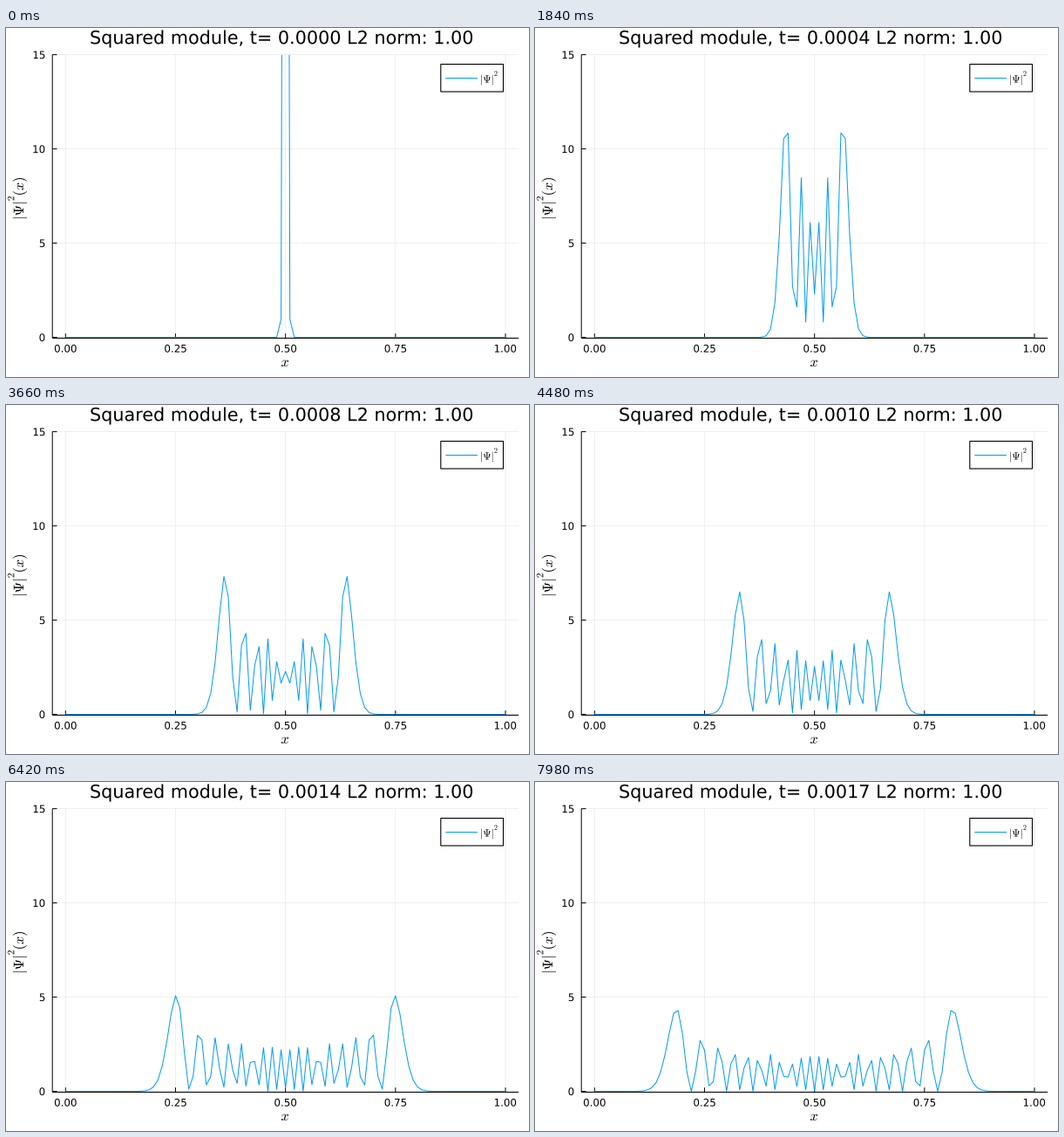
A matplotlib script that plays this animation: 600 by 400 pixels, repeating every 8000 ms.

```python
import numpy as np
import matplotlib.pyplot as plt
from matplotlib.animation import FuncAnimation
from matplotlib.patches import PathPatch, Rectangle
from matplotlib.textpath import TextPath
from matplotlib.transforms import Affine2D

plt.rcParams.update({
    "font.family": "DejaVu Sans",
    "mathtext.fontset": "cm",
    "path.snap": False,
})

W, H, DPI = 600, 400, 100
PT = 72 / DPI                                   # points per pixel
LEFT, RIGHT, TOP, BOTTOM = 53.2, 588.2, 30.6, 355.5
BLUE = "#009afa"
TITLE_SIZE, LABEL_SIZE, TICK_SIZE = 20.75, 16.3, 11.86

N, STEPS = 101, 172
DX, DT = 0.01, 1e-5
HOP = 0.0999                                    # hopping phase per step


def px(x):
    return 68.3 + 504.7 * np.asarray(x)


def py(y):
    return 354.5 - 21.593 * np.asarray(y)


def evolve():
    """Crank-Nicolson for a free particle released from one grid point."""
    ham = HOP * (2 * np.eye(N) - np.eye(N, k=1) - np.eye(N, k=-1))
    half = 0.5j * ham
    step = np.linalg.solve(np.eye(N) + half, np.eye(N) - half)
    psi = np.zeros(N, complex)
    psi[N // 2] = 1 / np.sqrt(DX)
    states = [psi]
    for _ in range(STEPS):
        states.append(step @ states[-1])
    return np.abs(states) ** 2


density = evolve()
grid = np.linspace(0, 1, N)

fig = plt.figure(figsize=(W / DPI, H / DPI), dpi=DPI, facecolor="white")
ax = fig.add_axes([0, 0, 1, 1])
ax.set(xlim=(0, W), ylim=(H, 0))
ax.axis("off")


def line(xs, ys, width=1.0, color="black", **kw):
    return ax.plot(xs, ys, color=color, lw=width * PT,
                   solid_capstyle="butt", **kw)[0]


def outline(x, y, text, size, ha="left", angle=0):
    """Glyph outlines with the baseline starting at pixel (x, y)."""
    path = TextPath((0, 0), text, size=size)
    box = path.get_extents()
    shift = {"left": 0, "center": (box.x0 + box.x1) / 2, "right": box.x1}[ha]
    place = Affine2D().translate(-shift, 0).scale(1, -1)
    return place.rotate_deg(-angle).translate(x, y).transform_path(path)


def label(*args, zorder=4, **kw):
    patch = PathPatch(outline(*args, **kw), fc="black", lw=0, zorder=zorder)
    return ax.add_patch(patch)


def squared_psi(x, y, size, tail="", angle=0):
    """|Psi| with a high, tight exponent and an optional tail."""
    turn = np.radians(angle)

    def put(text, along, up, scale=1):
        label(x + size * (along * np.cos(turn) - up * np.sin(turn)),
              y - size * (along * np.sin(turn) + up * np.cos(turn)),
              text, size * scale, angle=angle, zorder=6)

    put(r"$|\Psi|$", 0, 0)
    put("$2$", 1.334, 0.65, 0.7)
    if tail:
        put(tail, 1.69, 0)


def draw_axes():
    faint = dict(width=0.6, alpha=0.1, zorder=1)
    for v in (0, 0.25, 0.5, 0.75, 1):
        x = px(v)
        line([x, x], [TOP, BOTTOM], **faint)
        line([x, x], [BOTTOM, BOTTOM - 5.3], zorder=2)
        label(x, 371.6, f"{v:.2f}", TICK_SIZE, "center")
    for v in (0, 5, 10, 15):
        y = py(v)
        line([LEFT, RIGHT], [y, y], **faint)
        line([LEFT, LEFT + 5.3], [y, y], zorder=2)
        label(44.4, y + 4.5, str(v), TICK_SIZE, "right")
    line([LEFT, RIGHT], [BOTTOM, BOTTOM], zorder=2)
    line([LEFT, LEFT], [TOP, BOTTOM], zorder=2)
    label(320, 388, "$x$", LABEL_SIZE, "center")
    squared_psi(20, 220, LABEL_SIZE, "$(x)$", angle=90)


def draw_legend():
    ax.add_patch(Rectangle((498.8, 41.5), 71.7, 31.5, fc="white", ec="black",
                           lw=1.1 * PT, zorder=5))
    line([504.3, 541], [57.5, 57.5], color=BLUE, zorder=6)
    squared_psi(544, 62.5, TICK_SIZE)


draw_axes()
draw_legend()
title = label(96, 18.2, "Squared module", TITLE_SIZE)
curve = line(px(grid), py(density[1]), color=BLUE, zorder=3)
curve.set_clip_path(Rectangle((LEFT, TOP), RIGHT - LEFT, BOTTOM + 1 - TOP,
                              transform=ax.transData))


def step_at(tick):
    # three steps every 140 ms, held for 20, 100 and 20 ms
    cycle, phase = divmod(tick, 7)
    return 1 + 3 * cycle + (phase > 0) + (phase > 5)


def update(tick):
    k = step_at(tick)
    norm = density[k].sum() * DX
    t = (k + 5) // 10 * 10 * DT
    text = f"Squared module, t= {t:.4f} L2 norm: {norm:.2f}"
    title.set_path(outline(96, 18.2, text, TITLE_SIZE))
    curve.set_ydata(py(density[k]))
    return title, curve


anim = FuncAnimation(fig, update, frames=400, interval=20,
                     repeat=True, repeat_delay=0)
plt.show()
```
